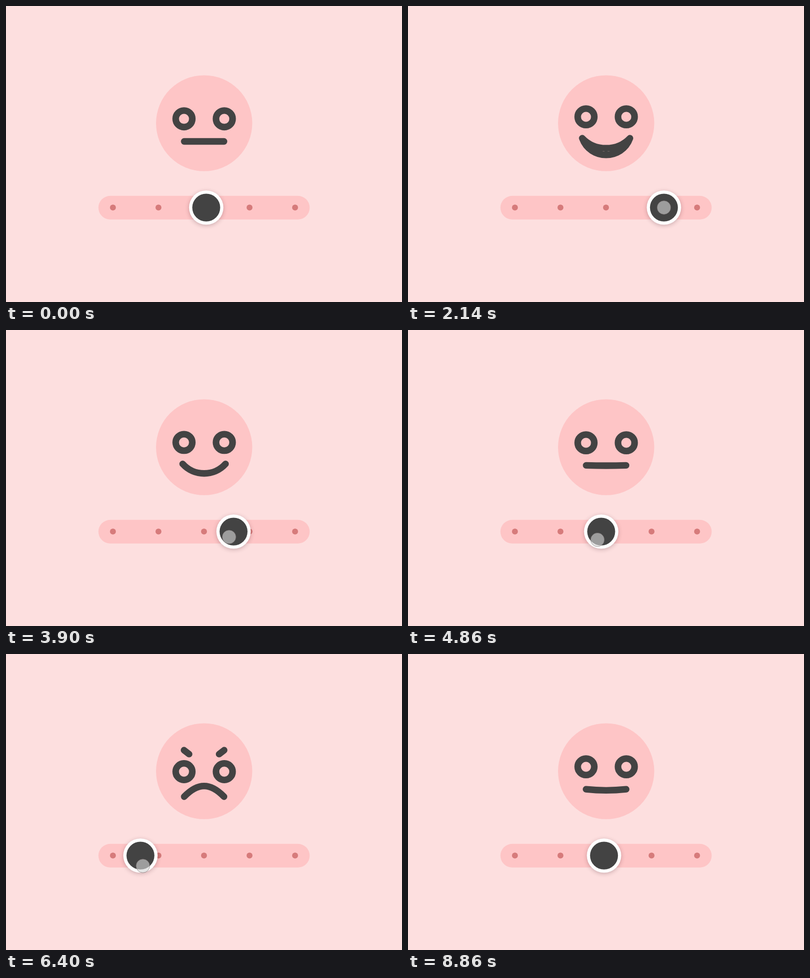
An HTML page with a canvas for the animation above (9320 ms loop, 800 by 600 pixels).

```html
<!DOCTYPE html>
<html lang="en">
<head>
<meta charset="utf-8">
<title>Mood slider</title>
<style>
  html, body { margin: 0; width: 100%; height: 100%; overflow: hidden; background: #fddfdf; }
  canvas { display: block; width: 800px; height: 600px; }
</style>
</head>
<body>
<canvas id="stage" width="800" height="600"></canvas>
<script>
const ctx = document.getElementById('stage').getContext('2d');
const LOOP = 9320;
const PINK = '#fec5c6', DARK = '#434343';
const MIN_X = 214.5, MAX_X = 582, TRACK_Y = 408.6;

const clamp = (v, lo = 0, hi = 1) => Math.min(hi, Math.max(lo, v));
const lerp = (a, b, k) => a + (b - a) * k;
const mix = (a, b, k) => a.map((v, i) => lerp(v, b[i], k));
const sine = k => (1 - Math.cos(Math.PI * k)) / 2;
const linear = k => k;
const easeIn = k => k ** 2.77;

// Pointer moves: start, end, target x, target y, easing of x and y.
const START = [720, -16];
const MOVES = [
  [60, 980, 400, 414, sine, sine],
  [1580, 2680, 627, 403.5, sine, sine],
  [3260, 4190, 401, 424, sine, sine],
  [4700, 5640, 144, 440.5, sine, sine],
  [5840, 6880, 380, 421, sine, sine],
  [6880, 7140, 386, 420, linear, linear],
  [7140, 7440, 391.5, 420, linear, linear],
  [7860, 8860, 708, -17, linear, easeIn]
];

function pointerAt(t) {
  let [x, y] = START;
  for (const [from, to, tx, ty, easeX, easeY] of MOVES) {
    if (t <= from) break;
    const k = clamp((t - from) / (to - from));
    x = lerp(x, tx, easeX(k));
    y = lerp(y, ty, easeY(k));
  }
  return [x, y];
}

function knobAt(t) {
  if (t < 1580) return 404.5;
  const grab = t < 5840 ? 4.5 : 4.5 * clamp((t - 7500) / 80);
  const [x] = pointerAt(Math.min(t, 7800) - 14);
  return clamp(x + grab, MIN_X, MAX_X);
}

// -2 angry, -1 sad, 0 neutral, 1 smile, 2 grin
function moodAt(t) {
  const x = knobAt(t), calm = t < 2600 ? 404.5 : 388;
  if (x > 492) return 1 + (x - 492) / (MAX_X - 492);
  if (x > calm) return (x - calm) / (492 - calm);
  if (x < 308) return -1 - (308 - x) / (308 - MIN_X);
  return -clamp((380 - x) / 72);
}

function disc(x, y, r, color) {
  ctx.beginPath();
  ctx.arc(x, y, r, 0, 2 * Math.PI);
  ctx.fillStyle = color;
  ctx.fill();
}

function line(x1, y1, x2, y2) {
  ctx.beginPath();
  ctx.moveTo(x1, y1);
  ctx.lineTo(x2, y2);
  ctx.stroke();
}

// Lips are [end x, end y, handle x, handle y], mirrored about the face centre.
const CENTER = 400.2;
const mirror = x => 2 * CENTER - x;
const FLAT = [360, 274.5, 387, 274.5];
const SMILE = [355.5, 270, 376.5, 307.4];
const FROWN = [360, 294, 388, 256];
const GRIN_TOP = [343, 262.7, 381, 262.7];
const GRIN_BOTTOM = [343, 262.7, 347, 327.8];

function drawMouth(mood) {
  const open = clamp(mood - 1);
  const base = mood < 0 ? mix(FLAT, FROWN, lerp(0, .6, clamp(-mood)) + .4 * clamp(-mood - 1))
                        : mix(FLAT, SMILE, clamp(mood));
  const [x, y, hx, hy] = mix(base, GRIN_BOTTOM, open);
  const [, , ux, uy] = mix(base, GRIN_TOP, open);

  ctx.beginPath();
  ctx.moveTo(x, y);
  ctx.bezierCurveTo(hx, hy, mirror(hx), hy, mirror(x), y);
  if (open > 0) {
    ctx.bezierCurveTo(mirror(ux), uy, ux, uy, x, y);
    ctx.closePath();
    const lips = new Path2D();
    lips.moveTo(x, y);
    lips.bezierCurveTo(hx, hy, mirror(hx), hy, mirror(x), y);
    lips.bezierCurveTo(mirror(ux), uy, ux, uy, x, y);
    lips.closePath();
    drawTeeth(lips);
    ctx.lineWidth = 13.3;
    ctx.stroke(lips);
  } else {
    ctx.lineWidth = 13.3;
    ctx.stroke();
  }
}

function drawTeeth(lips) {
  ctx.save();
  ctx.clip(lips);
  ctx.lineWidth = 6.5;
  for (const dx of [-28, 0, 28]) line(CENTER + dx, 250, CENTER + dx, 325);
  line(335, 285.5, 465, 285.5);
  ctx.restore();
}

function drawFace(mood) {
  disc(400.3, 237.6, 97.2, PINK);
  ctx.strokeStyle = DARK;
  ctx.lineCap = ctx.lineJoin = 'round';

  const anger = clamp(-mood - 1);
  const eyeY = 228.7 - 1.2 * clamp(mood) - 10.2 * clamp(mood - 1)
             + 5 * clamp(-mood) + 12.3 * anger;
  ctx.lineWidth = 13.3;
  for (const x of [359.6, 441]) {
    ctx.beginPath();
    ctx.arc(x, eyeY, 16.8, 0, 2 * Math.PI);
    ctx.stroke();
  }
  drawMouth(mood);

  if (anger > 0) {
    ctx.lineWidth = 13.3 * clamp(anger * 3);
    const y = 198 - 5 * (1 - anger);
    for (const side of [-1, 1]) {
      line(CENTER + side * 40.6, y, CENTER + side * (40.6 - 26.5 * anger), y + 20.5 * anger);
    }
  }
}

function drawSlider(x) {
  ctx.beginPath();
  ctx.roundRect(186.7, 384.8, 426.8, 48, 24);
  ctx.fillStyle = PINK;
  ctx.fill();
  for (let i = 0; i < 5; i++) disc(216 + 92 * i, TRACK_Y, 6, '#d67b7b');

  ctx.save();
  ctx.shadowColor = 'rgba(60, 20, 30, .25)';
  ctx.shadowBlur = 9;
  ctx.shadowOffsetY = 2;
  disc(x, TRACK_Y, 34.7, '#fff');
  ctx.restore();
  disc(x, TRACK_Y, 28.2, DARK);
}

function drawPointer([x, y]) {
  disc(x, y, 13.8, 'rgba(214, 214, 214, .61)');
  ctx.lineWidth = 1;
  ctx.strokeStyle = 'rgba(110, 100, 100, .6)';
  ctx.beginPath();
  ctx.arc(x, y, 13.8, 0, 2 * Math.PI);
  ctx.stroke();
}

function render(t) {
  ctx.fillStyle = '#fddfdf';
  ctx.fillRect(0, 0, 800, 600);
  drawFace(moodAt(t));
  drawSlider(knobAt(t));
  drawPointer(pointerAt(t));
}

const begin = performance.now();
function tick() {
  render((performance.now() - begin) % LOOP);
  requestAnimationFrame(tick);
}
tick();
</script>
</body>
</html>
```
